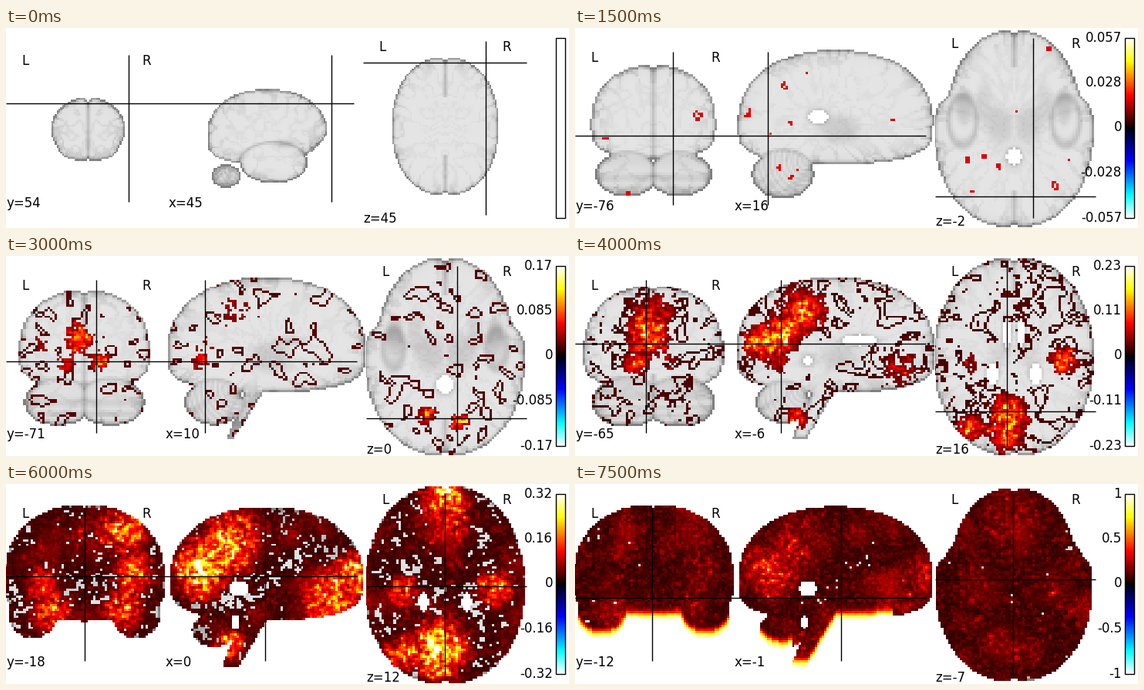
A matplotlib script for the animation above (8 s loop, 730 by 260 pixels).

```python
import matplotlib.pyplot as plt
import numpy as np
from matplotlib.animation import FuncAnimation
from matplotlib.patches import Rectangle

W, H, DPI, FRAMES = 730, 260, 100, 16
SPANS = [(0, 207), (207, 467), (467, 677)]  # coronal, sagittal, axial
AXES = [(1, 0, 2), (0, 1, 2), (2, 0, 1)]    # cut, across, up

# Brain space in mm, on a 2 mm grid
LOW, SIZE = np.array([-70, -108, -72]), (71, 92, 77)
X, Y, Z = np.meshgrid(*(lo + 2.0 * np.arange(n) for lo, n in zip(LOW, SIZE)), indexing="ij")

# Activity spreads from the first spot to the others: x, y, z, radius
SPOTS = [(13, -75, 0, 11), (-15, -68, -3, 11), (-6, -86, 17, 14), (-4, -66, 22, 17),
         (0, -46, 46, 23), (-36, -78, 16, 12), (-36, -24, 8, 11), (42, -20, 15, 13),
         (36, -22, 54, 16), (-27, -22, -20, 15), (32, -22, -18, 15), (0, -50, -50, 12),
         (0, 40, -8, 24), (0, 62, 18, 12)]

# Cut positions and colour range at key steps
KEYS = [1, 3, 4, 6, 8, 10, 12, 15]
CUT_X = [20, 16, 10, 10, -6, 0, 0, -1]
CUT_Y = [-86, -76, -71, -71, -65, -24, -18, -12]
CUT_Z = [-5, -2, 0, 0, 16, 19, 12, -7]
RANGE = [.031, .0568, .126, .17, .228, .28, .32, 1]


def noise(seed, size):
    """Gaussian-smoothed white noise with unit variance."""
    raw = np.random.default_rng(seed).standard_normal(SIZE)
    fx, fy, fz = np.meshgrid(*map(np.fft.fftfreq, SIZE), indexing="ij")
    low = np.exp(-2 * (np.pi * size) ** 2 * (fx**2 + fy**2 + fz**2))
    out = np.fft.ifftn(np.fft.fftn(raw) * low).real
    return out / out.std()


def sigmoid(t):
    return 1 / (1 + np.exp(-t))


def ball(x, y, z, rx, ry, rz):
    """Normalised squared radius, for a pair of mirrored ellipsoids."""
    return ((np.abs(X) - x) / rx) ** 2 + ((Y - y) / ry) ** 2 + ((Z - z) / rz) ** 2


def erode(on):
    out = on.copy()
    for axis in range(on.ndim):
        for k in (1, -1):
            out &= np.roll(on, k, axis)
    return out


def build():
    """Brain mask, grey tone and depth below the surface."""
    side = 67 - 12 * sigmoid((Y - 6) / 3) * sigmoid((4 - Z) / 4)
    rise = np.where(Z > 10, np.abs((Z - 10) / 66) ** 2.2, ((Z - 10) / 38) ** 4)
    cortex = np.abs(X / side) ** 2.2 + np.abs((Y + 17) / 87) ** 2.2 + rise
    temporal = ball(43, -10, -21, 21, 38, 23)
    cerebellum = ball(22, -63, -36, 30, 28, 22)
    slant = -25 + .48 * (Z + 20)
    width = 12 + .09 * (Z + 20)
    stem = (X / (width + 3)) ** 2 + ((Y - slant) / width) ** 2 + (np.abs(Z + 34) > 34)

    cleft = .07 * np.exp(-(X / 4) ** 2)
    mask = np.minimum.reduce([cortex + cleft, temporal, cerebellum, stem]) < 1
    depth, core = np.zeros(SIZE), mask
    for _ in range(10):
        depth += core
        core = erode(core)

    # Sulci: noise pulled outwards so that the folds run inwards
    reach = np.maximum(cortex, .05) ** -.3
    where = np.stack([np.abs(X) * reach, (Y + 17) * reach - 17, (Z - 10) * reach + 10])
    cells = np.round((where - LOW[:, None, None, None]) / 2).astype(int)
    cells = np.clip(cells, 0, np.array(SIZE)[:, None, None, None] - 1)
    fold = noise(1, 1.7)[tuple(cells)]

    tone = .9 - .06 * np.exp(-depth / 3) - .24 * np.exp(-((depth - 1) / .8) ** 2)
    tone -= .17 * np.exp(-(fold / .5) ** 2 - depth / 6)
    tone -= .13 * np.exp(-(X / 2.2) ** 2) * (cortex > .35)
    for part in (temporal, cerebellum):
        tone -= .13 * np.exp(-((part - 1) / .13) ** 2)
    tone -= .1 * np.exp(-ball(12, -14, 4, 13, 18, 14) ** 2)
    tone -= .07 * np.exp(-ball(25, 6, 3, 7, 20, 12) ** 2)
    tone -= .12 * np.exp(-ball(42, 2, 0, 7, 16, 6) ** 2)
    ripple = np.sin(np.hypot(Y + 42, Z + 24) * 1.3)
    tone += (.03 * ripple - .05) * (cerebellum < .9)

    for hole in [(0, -41, 1, 7, 8, 7), (0, -44, -29, 5, 4, 6),
                 (6, 4, 19, 4, 15, 5), (18, -32, 15, 5, 9, 7)]:
        r = ball(*hole)
        tone -= .15 * np.exp(-2 * np.maximum(r - 1, 0))
        mask &= r > 1
    return mask, np.clip(tone, .5, .96), depth


MASK, TONE, DEPTH = build()
FINE, BROAD, SLOW = noise(2, .55), noise(3, 1.6), noise(4, 4)
FLOOR = np.argmax(MASK, axis=2)[..., None]
GLOW = np.exp(-((np.arange(SIZE[2]) - FLOOR) / 3) ** 2) * (FLOOR < 25)


def hot(v):
    rgb = np.stack([.042 + v * 2.626, (v - .365) / .381, (v - .746) / .254], -1)
    return np.clip(rgb, 0, 1)


def state(i):
    """Cut position in mm and colour range of a step."""
    if i == 0:
        return (45, 54, 45), 0
    cut = tuple(int(round(np.interp(i, KEYS, c))) for c in (CUT_X, CUT_Y, CUT_Z))
    return cut, np.interp(i, KEYS, RANGE)


def layout(i):
    """Pixel of the brain's zero point in each view, and pixels per mm."""
    if i == 0:
        return [(106.5, 150.5), (359, 150.5), (569.5, 108)], (1.167,) * 3
    return [(101.8, 137.4), (363.2, 137.4), (569.3, 105.8)], (1.555, 1.485, 1.46)


def heat_map(i):
    heat = np.zeros(SIZE)
    seed = np.array(SPOTS[0][:3])
    for x, y, z, r in SPOTS:
        far = np.linalg.norm(seed - (x, y, z))
        amp = np.clip((2 * i * i - far) / 30, 0, 1)
        r = r * (.3 + .07 * i)
        heat += amp * np.exp(-((X - x) ** 2 + (Y - y) ** 2 + (Z - z) ** 2) / r**2)
    return heat


def activity(i, vmax, heat, cut):
    """Visible cells and their colours on one slice."""
    mask, fine, broad, slow, glow = map(cut, (MASK, FINE, BROAD, SLOW, GLOW))
    heat = cut(heat)
    base = max(.018 / vmax, .05)
    value = .5 * min(1, .35 / vmax) * heat * np.exp(.35 * fine)
    value = value + .9 * sigmoid(3 * (i - 13.5)) * glow
    show = value > base + .06

    share = .3 * np.exp(-((i - 8) / 2.6) ** 2)
    field = broad + .5 * heat
    blob = field > np.quantile(field[mask], 1 - share)
    show |= blob & ~erode(blob)

    fill = sigmoid((i - 9.7) / .95)
    if fill > .02:
        field = fine + .5 * broad + .4 * slow + 2 * heat
        show |= field > np.quantile(field[mask], 1 - fill)
    rough = np.abs(fine + .5 * broad) + np.maximum(slow, 0)
    value = np.maximum(value, base + .05 * fill * rough)
    return show & mask, hot(value)


def picture(i):
    page = np.ones((H, W, 3))
    at, vmax = state(i)
    zero, scale = layout(i)
    heat = heat_map(i)
    for (x0, x1), (a, h, v), (zx, zy) in zip(SPANS, AXES, zero):
        index = int(round((at[a] - LOW[a]) / 2))

        def cut(volume):
            return np.take(volume, index, axis=a)

        rgb = np.repeat(cut(TONE)[..., None], 3, -1)
        if vmax:
            show, color = activity(i, vmax, heat, cut)
            rgb[show] = color[show]
        rgb[~cut(MASK)] = 1
        across = (np.arange(x0, x1) + .5 - zx) / scale[h]
        up = (zy - np.arange(H) - .5) / scale[v]
        col = np.clip(np.round((across - LOW[h]) / 2).astype(int), 0, SIZE[h] - 1)
        row = np.clip(np.round((up - LOW[v]) / 2).astype(int), 0, SIZE[v] - 1)
        page[:, x0:x1] = rgb[col[None, :], row[:, None]]
    return page


pages = [picture(i) for i in range(FRAMES)]

fig = plt.figure(figsize=(W / DPI, H / DPI), dpi=DPI, facecolor="white")
ax = fig.add_axes([0, 0, 1, 1])
ax.axis("off")
image = ax.imshow(pages[0], extent=(0, W, H, 0), interpolation="nearest", aspect="auto")
level = np.linspace(1, -1, 256)
ramp = hot(np.abs(level))
ramp[level < 0] = ramp[level < 0][:, ::-1]
bar = ax.imshow(ramp[:, None], extent=(713, 725, 247, 13), aspect="auto")
ax.add_patch(Rectangle((713, 13), 12, 234, fill=False, ec="black", lw=1))
ax.set(xlim=(0, W), ylim=(H, 0))

cross = [ax.plot([], [], color="black", lw=1, solid_capstyle="butt")[0] for _ in range(5)]
style = dict(fontsize=12, family="DejaVu Sans", color="black", va="baseline")
marks = [ax.text(0, 0, s, **style) for s in "LRLR"]
names = [ax.text(0, 0, "", **style) for _ in range(3)]
ticks = [ax.text(709, 17.5 + 58.5 * k, "", ha="right", **style) for k in range(5)]


def draw(i):
    (x, y, z), vmax = state(i)
    (cx, cz), (sy, _), (ax_x, ax_y) = layout(i)[0]
    kx, ky, kz = layout(i)[1]
    image.set_data(pages[i])
    bar.set_visible(vmax > 0)

    # The first view is drawn smaller, so its frame is inset
    inset = 0 if vmax else 4
    top, low, end, left = 31 + inset, 230 - inset, 455 - inset, 467 - inset
    row, col = cz - kz * z, ax_y - ky * y
    cross[0].set_data([0, end], [row, row])
    cross[1].set_data([cx + kx * x] * 2, [top, low])
    cross[2].set_data([sy + ky * y] * 2, [top, low])
    cross[3].set_data([left, 675], [col, col])
    cross[4].set_data([ax_x + kx * x] * 2, [13 + inset, 247 - inset])

    high = [44 + inset, 26 + inset]
    for k, mark in enumerate(marks):
        mark.set_position(([20, 176, left + 20, 643][k], high[k // 2]))
    foot = 237 - inset
    places = [(0, foot), (207 + inset, foot), (left, 257 - inset)]
    for text, place, name, value in zip(names, places, "yxz", (y, x, z)):
        text.set_position(place)
        text.set_text(f"{name}={value}")
    for k, tick in enumerate(ticks):
        tick.set_text(f"{vmax * (2 - k) / 2:.2g}" if vmax else "")
    return [image, bar, *cross, *marks, *names, *ticks]


anim = FuncAnimation(fig, draw, frames=FRAMES, interval=500, repeat=True, repeat_delay=0)
plt.show()
```
